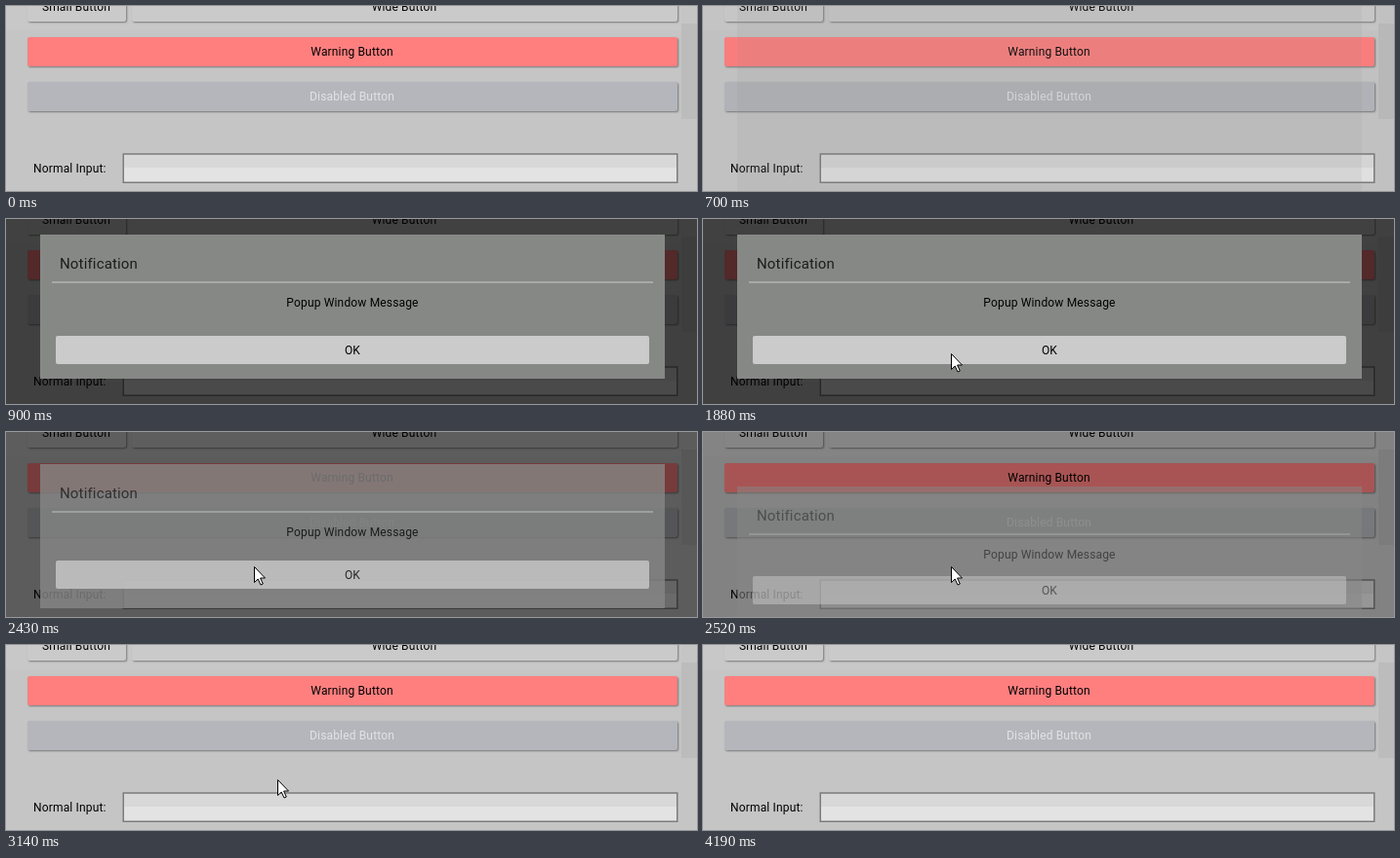
Animation, 708 px wide and 190 px high, one loop 4690 ms. Source, as an HTML page with a canvas:

```html
<!DOCTYPE html>
<html lang="en">
<head>
<meta charset="utf-8">
<title>Popup window</title>
<style>
  html, body { margin: 0; width: 100%; height: 100%; overflow: hidden; background: #c5c5c5; }
  canvas { display: block; }
</style>
</head>
<body>
<canvas id="stage" width="708" height="190"></canvas>
<script>
const ctx = document.getElementById('stage').getContext('2d');
const LOOP = 4690;
const arrow = new Path2D('M.5 .5V16.5L4.2 13L7 19L9.3 18L6.6 12H11.5Z');

// Pointer strokes; the last two run off the stage.
const strokes = [
  { start: 1380, end: 1560, steps: 5, from: [230, 166], to: [254, 101] },
  { start: 1710, end: 1880, steps: 4, from: [254, 107], to: [254, 138] },
  { start: 3140, end: 3270, steps: 4, from: [278, 138], to: [484, 166] },
  { start: 3520, end: 3760, steps: 5, from: [510, 171], to: [718, 192] },
  { start: 4070, end: 4190, steps: 2, from: [694, 184], to: [710, 192] }
];

const mix = (a, b, k) => a + (b - a) * k;

// Progress from 0 to 1, held at the given number of evenly spaced steps.
function stepped(t, start, end, steps) {
  const k = Math.min(1, Math.max(0, (t - start) / (end - start)));
  return Math.floor(k * (steps - 1) + .01) / (steps - 1);
}

function rect(x, y, w, h, color) {
  ctx.fillStyle = color;
  ctx.fillRect(x, y, w, h);
}

function round(x, y, w, h, color) {
  ctx.fillStyle = color;
  ctx.beginPath();
  ctx.roundRect(x, y, w, h, 2);
  ctx.fill();
}

function text(str, x, y, color = '#000', size = 12) {
  ctx.font = `${size}px Roboto, sans-serif`;
  ctx.letterSpacing = '0.16px';
  ctx.fillStyle = color;
  ctx.fillText(str, x, y);
}

function centered(str, x, y, color) {
  ctx.textAlign = 'center';
  text(str, x, y, color);
  ctx.textAlign = 'left';
}

function button(label, x, y, w, h, fill, ink) {
  ctx.save();
  ctx.shadowColor = 'rgba(0,0,0,.4)';
  ctx.shadowBlur = 2;
  ctx.shadowOffsetX = ctx.shadowOffsetY = 1;
  round(x, y, w, h, fill);
  ctx.restore();
  centered(label, x + w / 2 - .5, y + h - 11, ink);
}

function drawPage() {
  rect(0, 0, 708, 190, '#c5c5c5');
  rect(0, 0, 692, 25, '#c8c8c8');
  rect(692, 18, 16, 98, '#bcbcbc');
  button('Small Button', 22, -14, 101, 30, '#cacaca');
  button('Wide Button', 129, -14, 559, 30, '#cacaca');
  button('Warning Button', 22, 32, 666, 30, '#ff7f7f');
  button('Disabled Button', 22, 78, 666, 30, '#b5b6bb', '#e2e2e5');
  text('Normal Input:', 28, 171);
  rect(120, 152, 568, 29, '#d8d8d8');
  rect(120, 166, 568, 15, '#e3e3e3');
  ctx.strokeStyle = '#7c7c7c';
  ctx.lineWidth = 1.5;
  ctx.strokeRect(120.25, 152, 567.5, 29.25);
}

function drawPopup(shade, panel, ink, top, bottom, shift) {
  ctx.globalAlpha = shade;
  rect(0, 0, 708, 190, 'rgba(0,0,0,.675)');
  ctx.globalAlpha = panel;
  rect(35, top, 640, bottom - top, '#868886');
  ctx.globalAlpha = ink;
  text('Notification', 55, 51 + shift, '#1c1c1c', 15);
  rect(47, 64 + shift, 616, 2, '#a8aaa8');
  centered('Popup Window Message', 355, 90 + shift);
  const y = 120 + Math.round(shift * .7);
  round(51, y, 608, 29, '#cbcbcb');
  centered('OK', 355, y + 19);
  ctx.globalAlpha = 1;
}

function drawPointer(t) {
  const stroke = strokes.findLast(s => s.start <= t);
  if (!stroke) return;
  const { start, end, steps, from, to } = stroke;
  const k = stepped(t, start, end, steps);
  ctx.save();
  ctx.translate(...from.map((v, i) => Math.round(mix(v, to[i], k))));
  ctx.fillStyle = '#fff';
  ctx.strokeStyle = '#000';
  ctx.lineWidth = 1;
  ctx.fill(arrow);
  ctx.stroke(arrow);
  ctx.restore();
}

function draw(t) {
  drawPage();
  const shown = stepped(t, 700, 900, 5);
  const gone = stepped(t, 2292, 2630, 8) ** 1.25;
  if (gone > 0 && gone < 1) {
    const shift = Math.round(80 * gone), k = 1 - gone;
    drawPopup(k, k, k, 16 + shift, 164 + shift, shift);
  } else if (t >= 700 && !gone) {
    drawPopup(mix(.03, 1, shown), mix(.12, 1, shown), shown, mix(0, 16, shown), mix(190, 164, shown), 0);
  }
  drawPointer(t);
}

const start = performance.now();
function frame() {
  draw((performance.now() - start) % LOOP);
  requestAnimationFrame(frame);
}
frame();
</script>
</body>
</html>
```
